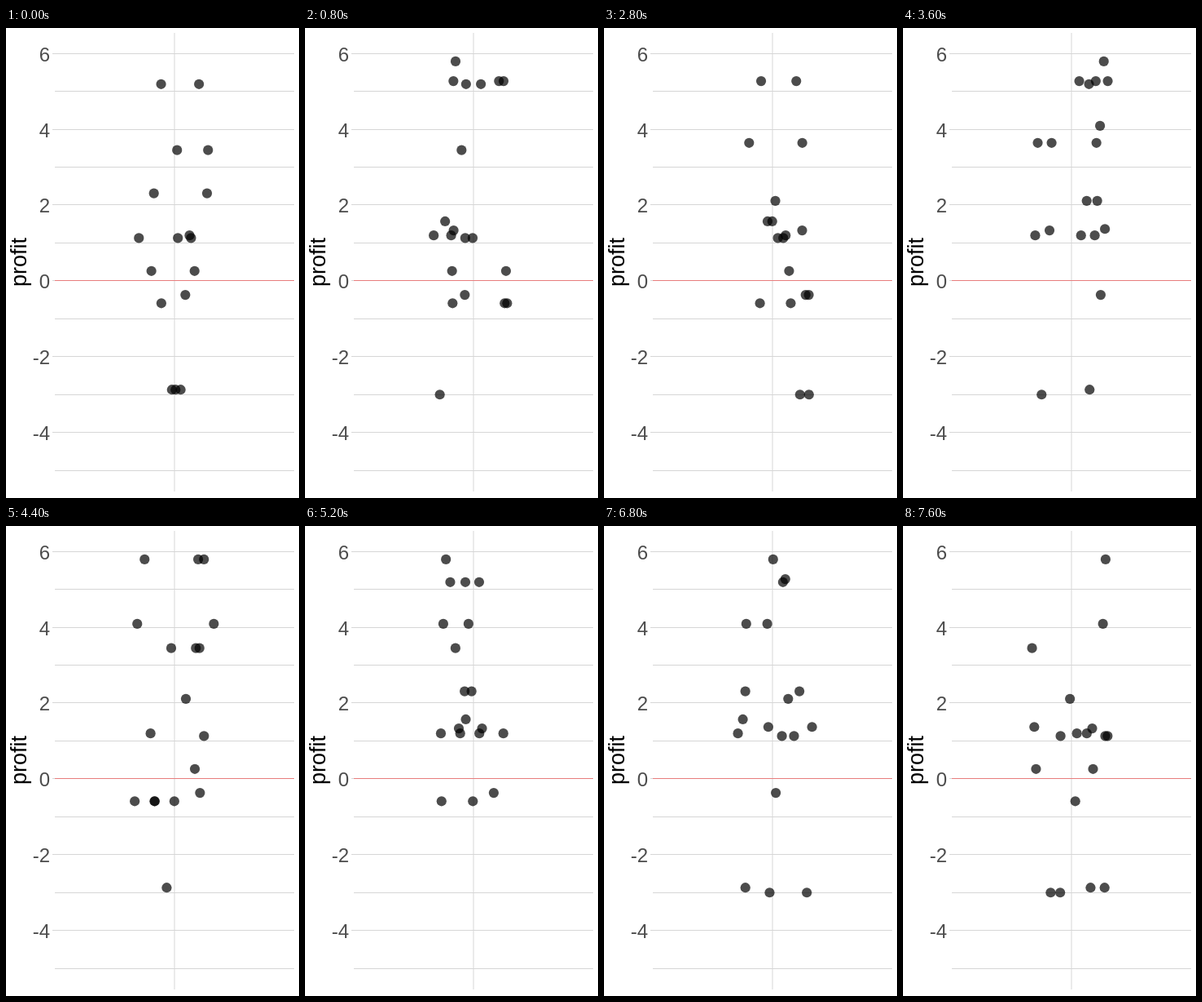
Write an HTML page that moves like this. It is 360 px wide and 576 px high and loops after 8000 ms.

```html
<!DOCTYPE html>
<html>
<head>
<meta charset="utf-8">
<style>
  html, body { margin: 0; height: 100%; overflow: hidden; background: #fff; }
  svg { display: block; font-family: "Liberation Sans", Arial, sans-serif; }
</style>
</head>
<body>
<svg width="360" height="576" viewBox="0 0 360 576">
  <g id="grid" stroke="#d6d6d6"><path d="M207 6V568"/></g>
  <path d="M60 309.5H354" stroke="#f00" stroke-opacity=".42"/>
  <g id="labels" font-size="24" fill="#4d4d4d" text-anchor="end"></g>
  <text transform="translate(24.5 287) rotate(-90)" font-size="27" text-anchor="middle">profit</text>
  <g id="dots" fill-opacity=".7"></g>
</svg>
<script>
const STEP = 400, STEPS = 20;
const CENTER = 207, JITTER = 49;
const profits = [5.79, 5.27, 5.19, 4.09, 3.64, 3.45, 2.31, 2.11, 1.57,
  1.37, 1.33, 1.2, 1.13, 0.26, -0.37, -0.59, -2.87, -3];
const yOf = profit => 309.88 - 46.45 * profit;
const byId = id => document.getElementById(id);

function add(parent, tag, attrs, text = '') {
  const el = document.createElementNS('http://www.w3.org/2000/svg', tag);
  for (const key in attrs) el.setAttribute(key, attrs[key]);
  el.textContent = text;
  parent.append(el);
}

for (let v = -5; v <= 6; v++) {
  const y = Math.floor(yOf(v)) + 0.5;
  const major = v % 2 === 0;
  add(byId('grid'), 'path', { d: `M${major ? 57 : 60} ${y}H354` });
  if (major) add(byId('labels'), 'text', { x: 54, y: y + 9 }, v);
}

let seed = 7;
const random = () => (seed = (seed * 16807) % 2147483647) / 2147483647;

// Each step draws profits with replacement and jitters them sideways.
function resample() {
  const count = 17 + Math.floor(random() * 4);
  return Array.from({ length: count }, () => ({
    cx: CENTER + (random() * 2 - 1) * JITTER,
    cy: yOf(profits[Math.floor(random() * profits.length)]),
    r: 6.1
  }));
}

const samples = Array.from({ length: STEPS }, resample);

let shown = -1;
function draw() {
  const step = Math.floor(performance.now() / STEP) % STEPS;
  if (step !== shown) {
    shown = step;
    byId('dots').replaceChildren();
    samples[step].forEach(dot => add(byId('dots'), 'circle', dot));
  }
  requestAnimationFrame(draw);
}
draw();
</script>
</body>
</html>
```
